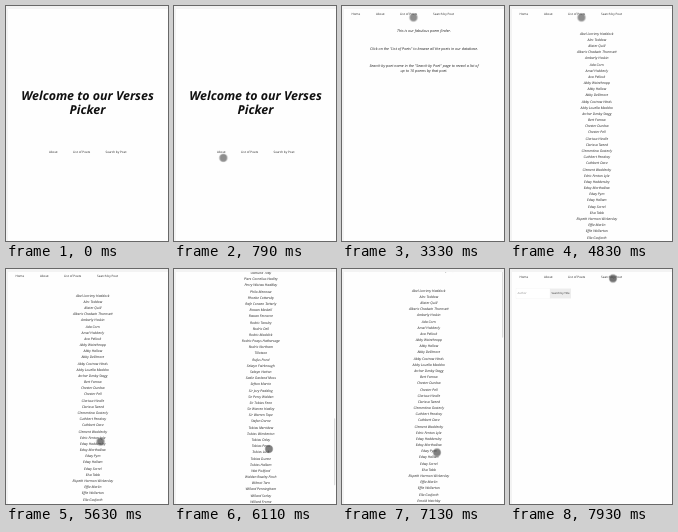
An HTML page that plays this animation: 162x235 px, repeating every 8000 ms.

```html
<!DOCTYPE html>
<html lang="en">
<head>
<meta charset="utf-8">
<title>Verses Picker</title>
<style>
@property --scroll { syntax: "<number>"; inherits: true; initial-value: 0; }
html, body { margin: 0; width: 100%; height: 100%; overflow: hidden; background: #f3f3f3; }
svg { display: block; width: 162px; height: 235px; }
text {
  font: 3.05px "Open Sans", "Noto Sans", sans-serif;
  fill: #222;
  text-rendering: geometricPrecision;
}
.title text { font-size: 12.4px; font-weight: 700; font-style: italic; fill: #111; }
.mid text { text-anchor: middle; }
.copy text { font-size: 3.72px; font-style: italic; }
.names text { font-size: 3.45px; font-style: italic; }
.hint { fill: #888; }

.page, .top, .bar { visibility: hidden; animation: 8s step-end infinite; }
.home { animation-name: home; }
.about { animation-name: about; }
.list { animation-name: list; }
.search { animation-name: search; }
.top { animation-name: top; }
.bar { animation-name: bar; }
@keyframes home { 0% { visibility: visible } 23.625%, 100% { visibility: hidden } }
@keyframes about { 0% { visibility: hidden } 23.625% { visibility: visible } 59.625%, 100% { visibility: hidden } }
@keyframes list { 0% { visibility: hidden } 59.625% { visibility: visible } 99.125%, 100% { visibility: hidden } }
@keyframes search { 0% { visibility: hidden } 99.125%, 100% { visibility: visible } }
@keyframes top { 0% { visibility: hidden } 23.625%, 100% { visibility: visible } }
@keyframes bar { 0% { visibility: hidden } 71.1% { visibility: visible } 92.8%, 100% { visibility: hidden } }

.view { animation: scroll 8s linear infinite; }
.roll { transform: translateY(calc(var(--scroll) * -1px)); }
.thumb { transform: translateY(calc(var(--scroll) * .285px)); }
@keyframes scroll {
  0%, 70.375% { --scroll: 0 }
  71.125% { --scroll: 60 }
  71.875% { --scroll: 170 }
  72.625% { --scroll: 285 }
  73.375% { --scroll: 370 }
  74.125%, 74.9% { --scroll: 420 }
  75.625% { --scroll: 470 }
  76.375% { --scroll: 523.5 }
  77.125% { --scroll: 558 }
  78.625% { --scroll: 583 }
  80.125%, 81.625% { --scroll: 589 }
  82.375% { --scroll: 520 }
  83.125% { --scroll: 375 }
  83.875% { --scroll: 227.5 }
  84.625% { --scroll: 135 }
  85.375% { --scroll: 78 }
  86.875% { --scroll: 26 }
  88.375% { --scroll: 8 }
  91.375%, 100% { --scroll: 0 }
}

.cursor { opacity: 0; animation: move 8s infinite, show 8s step-end infinite; }
.cursor circle { animation: press 8s step-end infinite; }
@keyframes show { 0% { opacity: 0 } 1.625%, 100% { opacity: 1 } }
@keyframes press {
  0% { fill-opacity: .58 }
  53.125% { fill-opacity: .72 }
  56.375% { fill-opacity: .58 }
  70.375% { fill-opacity: .65 }
  95.875%, 100% { fill-opacity: .72 }
}
@keyframes move {
  0%, 1.625% { transform: translate(76px, 217px); animation-timing-function: ease-in-out }
  10.625% { transform: translate(49px, 151px) }
  13.625%, 23.625% { transform: translate(46.5px, 148.5px); animation-timing-function: ease-in-out }
  33.5%, 64% { transform: translate(71.5px, 11.5px); animation-timing-function: ease-in-out }
  70.375% { transform: translate(94.5px, 172.5px) }
  76.375% { transform: translate(95px, 180px) }
  83.875%, 92.125% { transform: translate(95px, 183.5px); animation-timing-function: ease-in-out }
  95.875%, 100% { transform: translate(103px, 9.5px) }
}
</style>
</head>
<body>
<svg viewBox="0 0 162 235">
  <defs><clipPath id="pane"><path d="M2 3H162V235H2Z"/></clipPath></defs>
  <path d="M2 3H162V235H2Z" fill="#fefefe"/>
  <g class="view" clip-path="url(#pane)">
    <g class="page home">
      <g class="mid title">
        <text x="81.5" y="94.3">Welcome to our Verses</text>
        <text x="81.5" y="108.3">Picker</text>
      </g>
      <text x="43" y="147">About</text>
      <text x="67" y="147">List of Poets</text>
      <text x="99.5" y="147">Search by Poet</text>
    </g>
    <g class="roll">
      <g class="top">
        <text x="9.5" y="9">Home</text>
        <text x="34" y="9">About</text>
        <text x="58" y="9">List of Poets</text>
        <text x="91" y="9">Search by Poet</text>
      </g>
      <g class="page list mid names" id="names"></g>
    </g>
    <g class="page about mid copy">
      <text x="82" y="26.2">This is our fabulous poem finder.</text>
      <text x="82" y="43.6">Click on the "List of Poets" to browse all the poets in our database.</text>
      <text x="82" y="61.2">Search by poet name in the "Search by Poet" page to reveal a list of</text>
      <text x="82" y="66.2">up to 10 poems by that poet.</text>
    </g>
    <g class="page search">
      <path d="M6 19.5H40V29.5H6Z" fill="#fff" stroke="#f4f4f4" stroke-width=".5"/>
      <path d="M40 19.5H61V29.5H40Z" fill="#ededed"/>
      <text class="hint" x="7.5" y="25.3" style="font-size:2.8px">Author</text>
      <text x="50.5" y="25.4" text-anchor="middle" style="font-size:2.7px">Search by Title</text>
    </g>
    <g class="bar"><rect class="thumb" x="160" y="0" width="1.2" height="67" rx=".6" fill="#dcdcdc"/></g>
  </g>
  <g class="cursor"><circle r="3.7" fill="#3c3c3c" stroke="#888" stroke-opacity=".35" stroke-width="1.2"/></g>
</svg>
<script>
const poets = `Abel Lorrimy Haddock,Alec Toddow,Alister Quill,Alberic Chadwin Thornsett,Amberly Hoskin,Ada Corn,Ansel Hobberly,Ava Pellock
Abby Wainthropp,Abby Hallow,Abby Dellimore,Abby Costrow Hinds,Abby Louella Maddox,Archer Denby Stagg,Bert Farrow,Chester Dunlow
Chester Pell,Clarissa Hindle,Clarissa Tweed,Clementina Gosterly,Cuthbert Pendray,Cuthbert Dace,Clement Wadderby,Edric Fenton Lyle
Edwy Haddersley,Edwy Morthallow,Edwy Pym,Edwy Hallam,Edwy Sorrel,Elsa Tabb,Elspeth Harmon Wickersley,Effie Marlin
Effie Wollerton,Ella Gosforth,Ernold Hatchby,Eustace Penn,Fabian Wetherstone,Godfrey Hallowes,Gemma Tarn,Gervase Holden Lord Wyre
Gervase Tindal,Gervase Tolliver,Gerwin Stanley Brockett,Hester Dunn Maplow,Hector Lyall Gosling,Hector Bramley,Hector Fanderforth Millbrook,Humph Denley Oversedge
Ivor Tebbs,Jasper Colby Reith Fenn,Jasper Dobson,Jasper Oakham Teal,Jess Corbin,Jess Harlow,Joel Stave,Joel Pinner
Joel Tansy,Joel Marshleaf Pottinger,Joel Tebb,Joel McNabbow,Joel Hatton,Joel Grumbold,Joel Fenner,Jonas Quaife
Josiah Pellow,Joy Dunster,Juno Garth Lowe,Justus Pemberly,Kathleen Mottram,Lady Orla Penhaligh,Leon Fossick,Lisbet Oakhanger Toll
Lorna Fay Bescott,Major Rufus Dillingham,Mack Tolver,Mabel Honoria Westbridge,Matthias Dorn,Matthias Quy,Miles Tarraday,Osbert Fennimore
Osbert Tindle Marsh,Osmund Tilby,Piers Cornelius Hadley,Perry Wistow Haddley,Philo Mennow,Phoebe Cottersby,Rafe Corwen Tatterly,Rowan Maskell
Rowan Fernacre,Rodric Tansley,Rodric Dell,Rodric Maddick,Rodric Powys Hathersage,Rodric Northam,Tillotson,Rufus Pond
Selwyn Fairbrough,Selwyn Hatton,Sadie Garland Moss,Sefton Marrin,Sir Jory Padding,Sir Percy Walden,Sir Tobias Fenn,Sir Warren Hadley
Sir Warren Tope,Stefan Dorne,Tobias Merridew,Tobias Wimberton,Tobias Oxley,Tobias Penn,Tobias Lusk,Tobias Dunne
Tobias Hallam,Wat Pickford,Walden Rowley Finch,Wilmot Tarn,Willard Penningham,Willard Sorley,Willard Frome,Willard Tansey
Willard Hobbin,Willard Pallen Stroud,Willard Osric Mabley,Willard Denis Towle,Willard Hoskyn,Willard Thackelby,Willard Jasper McTorrigan,Willard Haughton Pell,Willard Fernsworth`.split(/[,\n]/);

const ns = "http://www.w3.org/2000/svg";
const names = document.getElementById("names");
poets.forEach((name, i) => {
  const row = document.createElementNS(ns, "text");
  row.setAttribute("x", 86.8);
  row.setAttribute("y", 28.6 + i * 6.18);
  row.textContent = name;
  names.append(row);
});
</script>
</body>
</html>
```
